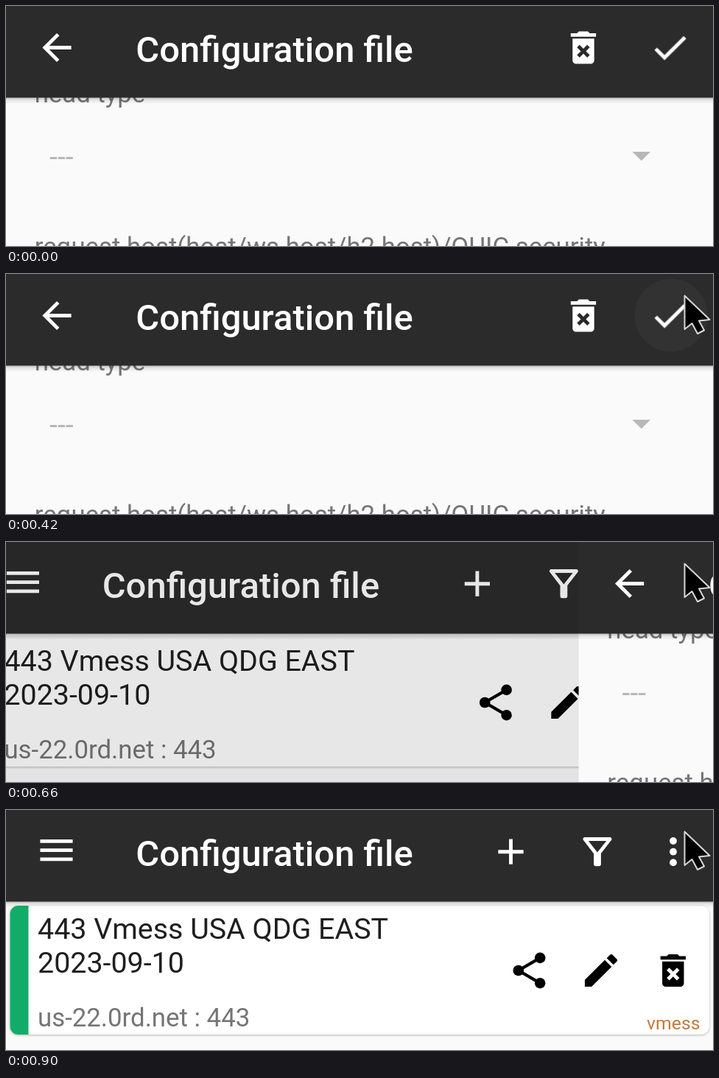
An HTML page that plays this animation: 960x326 px, repeating every 0.93 s.

```html
<!DOCTYPE html>
<html lang="en">
<head>
<meta charset="utf-8">
<title>Configuration file</title>
<style>
  /* --p: how far the front page has slid off to the right */
  @property --p { syntax: "<number>"; inherits: true; initial-value: 0; }

  html, body { margin: 0; width: 100%; height: 100%; overflow: hidden; background: #fafafa; }
  svg { display: block; width: 960px; height: 326px; font-family: Roboto, sans-serif; }
  .stage, .cursor, .hover, .press { animation: slide 930ms step-end infinite; }

  .page { transform: translateX(calc(var(--p) * 960px)); }
  .list { transform: translateX(calc((1 - var(--p)) * -240px)); }
  .scrim { opacity: calc((1 - var(--p)) * .5); }
  .cursor { animation-name: point; }
  .hover { animation-name: hover; }
  .press { animation-name: press; }

  .title { font-size: 48.9px; font-weight: 500; fill: #fff; }
  .name { font-size: 39.4px; fill: #1f1f1f; }
  .label { font-size: 34.8px; fill: #757575; }
  .off { font-size: 39.4px; fill: #b4b4b4; }
  .tag { font-size: 24.8px; fill: #c07b3c; }
  .card { filter: drop-shadow(0 1px 1.5px rgba(0, 0, 0, .28)); }

  @keyframes slide {
    0% { --p: 0; }
    61.24% { --p: .027; }
    64.47% { --p: .25; }
    67.69% { --p: .556; }
    70.92% { --p: .81; }
    74.14% { --p: .936; }
    77.37% { --p: .983; }
    80.6% { --p: .996; }
    83.82%, 100% { --p: 1; }
  }
  @keyframes point {
    0% { transform: translate(60px, -110px); }
    16.08% { transform: translate(28px, -58px); }
    19.3% { transform: translate(17px, -36px); }
    22.53% { transform: translate(10px, -20px); }
    25.76% { transform: translate(5px, -9px); }
    28.98% { transform: translate(1px, -2px); }
    32.21%, 100% { transform: none; }
  }
  @keyframes hover {
    0% { opacity: 0; }
    28.98% { opacity: .4; }
    32.21% { opacity: .8; }
    35.43% { opacity: 1; }
    61.24% { opacity: .4; }
    64.47%, 100% { opacity: 0; }
  }
  @keyframes press {
    0% { opacity: 0; }
    58.01% { opacity: .7; }
    61.24% { opacity: 1; }
    64.47%, 100% { opacity: 0; }
  }
</style>
</head>
<body>
<svg viewBox="0 0 960 326">
  <defs>
    <linearGradient id="shade" x2="0" y2="1">
      <stop offset="0" stop-opacity=".26"/>
      <stop offset=".4" stop-opacity=".09"/>
      <stop offset="1" stop-opacity="0"/>
    </linearGradient>
    <radialGradient id="glow">
      <stop offset="0" stop-color="#fff" stop-opacity=".2"/>
      <stop offset=".6" stop-color="#fff" stop-opacity=".12"/>
      <stop offset="1" stop-color="#fff" stop-opacity="0"/>
    </radialGradient>

    <!-- icons on a 24 unit grid, centred on 0,0 -->
    <g id="back" transform="scale(2.45) translate(-12 -12)">
      <path d="M20 11H7.83l5.59-5.59L12 4l-8 8 8 8 1.41-1.41L7.83 13H20z"/>
    </g>
    <g id="menu" transform="scale(2.45) translate(-12 -12)">
      <path d="M3 6h18v2H3zM3 11h18v2H3zM3 16h18v2H3z"/>
    </g>
    <g id="trash" transform="scale(2.45) translate(-12 -12)">
      <path d="M6 19c0 1.1.9 2 2 2h8c1.1 0 2-.9 2-2V7H6v12zm2.46-7.12l1.41-1.41L12 12.59l2.12-2.12 1.41 1.41L13.41 14l2.12 2.12-1.41 1.41L12 15.41l-2.12 2.12-1.41-1.41L10.59 14zM15.5 4l-1-1h-5l-1 1H5v2h14V4z"/>
    </g>
    <g id="check" transform="scale(2.45) translate(-12 -12)">
      <path d="M9 16.17L4.83 12l-1.42 1.41L9 19 21 7l-1.41-1.41z"/>
    </g>
    <g id="plus" transform="scale(2.45) translate(-12 -12)">
      <path d="M19 13h-6v6h-2v-6H5v-2h6V5h2v6h6z"/>
    </g>
    <g id="filter" transform="scale(2.45) translate(-12 -12)">
      <path d="M7 6h10l-5.01 6.3zm-2.75-.39C6.27 8.2 10 13 10 13v6c0 .55.45 1 1 1h2c.55 0 1-.45 1-1v-6s3.72-4.8 5.74-7.39c.51-.66.04-1.61-.79-1.61H5.04c-.83 0-1.3.95-.79 1.61z"/>
    </g>
    <g id="more" transform="scale(2.45)">
      <circle cy="-6" r="2"/><circle r="2"/><circle cy="6" r="2"/>
    </g>
    <g id="share" transform="scale(2.45) translate(-12 -12)">
      <path d="M18 5L6 12l12 7" fill="none" stroke="#000" stroke-width="1.7"/>
      <circle cx="18" cy="5" r="3"/><circle cx="6" cy="12" r="3"/><circle cx="18" cy="19" r="2.95"/>
    </g>
    <g id="edit" transform="scale(2.45) translate(-12 -12)">
      <path d="M3 17.25V21h3.75L17.81 9.94l-3.75-3.75zM20.71 7.04c.39-.39.39-1.02 0-1.41l-2.34-2.34c-.39-.39-1.02-.39-1.41 0l-1.83 1.83 3.75 3.75z"/>
    </g>

    <g id="bar">
      <rect y="124" width="960" height="9" fill="url(#shade)"/>
      <rect width="960" height="124.5" fill="#2b2b2b"/>
      <text class="title" x="176.3" y="76">Configuration file</text>
    </g>
  </defs>

  <g class="stage">
    <g class="list">
      <rect width="960" height="326" fill="#fafafa"/>
      <g class="card">
        <rect x="5.5" y="130" width="949.5" height="175" rx="11" fill="#fff"/>
        <path d="M30.5 130h-14a11 11 0 0 0-11 11v153a11 11 0 0 0 11 11h14z" fill="#12ac69"/>
      </g>
      <text class="name" x="43" y="175">443 Vmess USA QDG EAST</text>
      <text class="name" x="43" y="221">2023-09-10</text>
      <text class="label" x="43" y="294">us-22.0rd.net : 443</text>
      <text class="tag" x="870" y="298">vmess</text>
      <use href="#share" x="710.5" y="218"/>
      <use href="#edit" x="808" y="218"/>
      <use href="#trash" x="905.8" y="218"/>
      <use href="#bar"/>
      <g fill="#fff">
        <use href="#menu" x="68.5" y="54.6"/>
        <use href="#plus" x="685.5" y="56.7"/>
        <use href="#filter" x="803" y="56.7"/>
        <use href="#more" x="906" y="56.7"/>
      </g>
      <rect class="scrim" width="960" height="326"/>
    </g>

    <g class="page">
      <rect y="124" width="960" height="202" fill="#fafafa"/>
      <text class="label" x="38.7" y="131">head type</text>
      <text class="off" x="59" y="217.5">---</text>
      <path d="M850.5 198h24.5l-12.25 12.2z" fill="#b8b8b8"/>
      <text class="label" x="38.7" y="339">request host(host/ws host/h2 host)/QUIC security</text>
      <use href="#bar"/>
      <circle class="hover" cx="903" cy="56" r="49.5" fill="#323232"/>
      <circle class="press" cx="914" cy="34" r="27" fill="url(#glow)"/>
      <g fill="#fff">
        <use href="#back" x="69" y="56.5"/>
        <use href="#trash" x="784" y="56.5"/>
        <use href="#check" x="901.5" y="56.5"/>
      </g>
    </g>
  </g>

  <path class="cursor" d="M921.5 29.5V75l10-8 7.5 14 9-4.5-7-13 14.5-1.5z" stroke="#d8d8d8" stroke-width="2" stroke-linejoin="round"/>
</svg>
</body>
</html>
```
